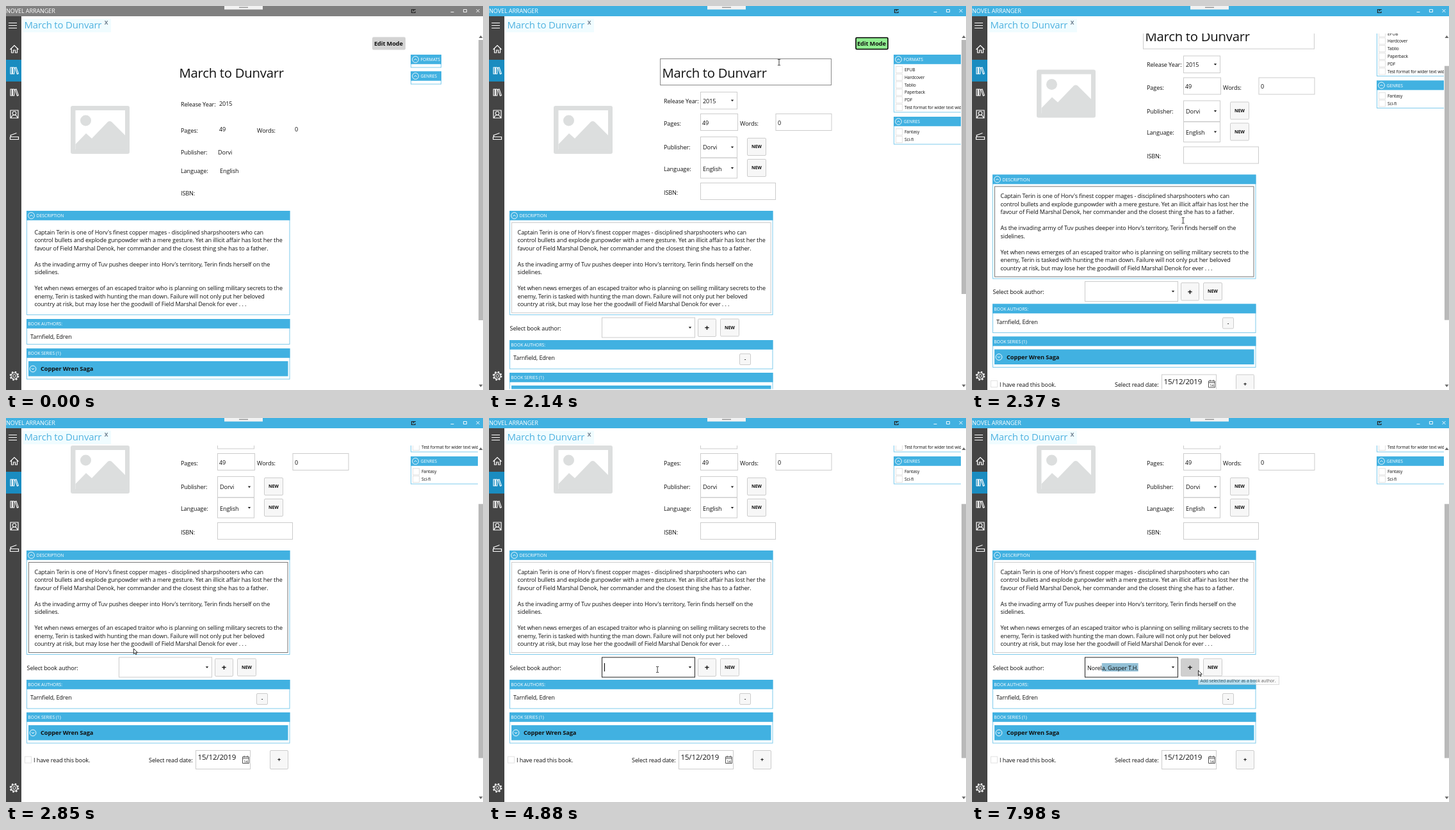
Recreate the animation shown at these times as an HTML page. Size 745 by 600 pixels, loop 8 s.

```html
<!DOCTYPE html>
<html lang="en">
<head>
<meta charset="utf-8">
<title>Book details</title>
<style>
html, body { margin: 0; width: 100%; height: 100%; overflow: hidden; background: #fff; }
svg { display: block; font-family: "Open Sans", "Noto Sans", sans-serif; }
text { letter-spacing: -.012em; white-space: pre; }
</style>
</head>
<body>
<svg id="stage" width="745" height="600" viewBox="0 0 745 600"></svg>
<script>
const LOOP = 8000;
const BLUE = '#41b1e1';
const TITLE = 'March to Dunvarr';
const PICK = 'Norela, Gasper T.H.';

// Drawing helpers; boxes are given by their edges
const text = (x, y, s, size = 9.1, more = '') =>
  `<text x="${x}" y="${y}" font-size="${size}" fill="#111" ${more}>${s}</text>`;
const white = (x, y, s, size = 6.93) => text(x, y, s, size, 'style="fill:#fff"');
const bold = (x, y, s, size, more = '') => text(x, y, s, size, 'font-weight="700" ' + more);
const fill = (x0, y0, x1, y1, color, more = '') =>
  `<rect x="${x0}" y="${y0}" width="${x1 - x0}" height="${y1 - y0}" fill="${color}" ${more}/>`;
const box = (x0, y0, x1, y1, line = '#ccc', back = '#fff', more = '') =>
  fill(x0 + .5, y0 + .5, x1 - .5, y1 - .5, back, `stroke="${line}" ${more}`);
const line = (d, color = '#fff', width = 1, more = '') =>
  `<path d="${d}" fill="none" stroke="${color}" stroke-width="${width}" ${more}/>`;
const group = (id, body) => `<g id="${id}">${body}</g>`;

const chevron = (x, y, up) =>
  `<circle cx="${x}" cy="${y}" r="4.9" fill="none" stroke="#fff" stroke-width=".9"/>` +
  line(up ? `M${x - 2} ${y + 1}l2-2 2 2` : `M${x - 2} ${y - 1}l2 2 2-2`);
const panel = (x0, y0, x1, y1, name, open) =>
  box(x0, y0, x1, y1, '#7fcbec') + fill(x0, y0, x1, y0 + 14.8, BLUE) +
  (open ? chevron(x0 + 7.5, y0 + 7.5, true) : '') +
  white(x0 + (open ? 15.5 : 2.2), y0 + 10, name);
const button = (x0, y0, x1, y1, label, size = 6.9, id = '') =>
  box(x0, y0, x1, y1, '#ccc', '#f7f7f7', `rx="1.5" ${id}`) +
  bold((x0 + x1) / 2, (y0 + y1) / 2 + size * .36, label, size, 'text-anchor="middle"');
const combo = (x0, y0, x1, y1, id = '') => {
  const x = x1 - 8, y = (y0 + y1) / 2;
  return box(x0, y0, x1, y1, '#ccc', '#fff', id) +
    `<path d="M${x - 2.2} ${y - 1.2}h4.4l-2.2 2.8z" fill="#222"/>`;
};
const check = (x, y) => box(x, y - 5.5, x + 11, y + 5.5, '#e2e2e2');

const picture = fill(101, 156, 193, 231, '#dcdede', 'rx="3"') +
  fill(108.5, 163, 186, 224, '#fff') +
  '<circle cx="124.5" cy="179" r="8.5" fill="#dcdede"/>' +
  '<path d="M108.5 216L125 199l9 8 25-26q3-2 6 0l21 21v22.5h-77.5z" fill="#dcdede"/>';

const blurb = [
  [0, 'Captain Terin is one of Horv\'s finest copper mages - disciplined sharpshooters who can'],
  [1, 'control bullets and explode gunpowder with a mere gesture. Yet an illicit affair has lost her the'],
  [2, 'favour of Field Marshal Denok, her commander and the closest thing she has to a father.'],
  [4, 'As the invading army of Tuv pushes deeper into Horv\'s territory, Terin finds herself on the'],
  [5, 'sidelines.'],
  [7, 'Yet when news emerges of an escaped traitor who is planning on selling military secrets to the'],
  [8, 'enemy, Terin is tasked with hunting the man down. Failure will not only put her beloved'],
  [9, 'country at risk, but may lose her the goodwill of Field Marshal Denok for ever . . .']
].map(([row, s]) => text(44.5, 356.6 + row * 12.53, s)).join('');

const authors = (y, y1, base) =>
  panel(32, y, 443.5, y1, 'BOOK AUTHORS:') + text(38, base, 'Tarnfield, Edren');
const series = y =>
  panel(32, y, 443.5, y + 48.5, 'BOOK SERIES (1)') +
  fill(35, y + 20, 440.5, y + 43.5, BLUE) + chevron(42, y + 32, false) +
  bold(54, y + 35.3, 'Copper Wren Saga', 9.3);
const labels = rows => rows.map(([x, y, s]) => text(x, y, s)).join('');

const shared = picture + text(270.5, 111.5, TITLE, 20.3);

const view =
  box(572, 48.5, 624, 68.5, '#d3d3d3', '#d3d3d3', 'rx="1.5"') + bold(575, 62, 'Edit Mode', 9.2) +
  panel(632, 76, 680, 96.5, 'FORMATS', true) + panel(632, 102, 680, 122.5, 'GENRES', true) +
  shared +
  labels([[273, 157, 'Release Year:'], [333, 155.5, '2015'], [273, 197.5, 'Pages:'], [333, 196, '49'],
    [392, 197.5, 'Words:'], [451, 196, '0'], [273, 232.3, 'Publisher:'], [331, 232.3, 'Dorvi'],
    [273, 260.6, 'Language:'], [334, 260.6, 'English'], [273, 295.5, 'ISBN:']]) +
  panel(32, 320, 443.5, 483, 'DESCRIPTION', true) + blurb +
  authors(489, 529, 520.3) + series(535);

const list = (names, y) => names.map((s, i) =>
  check(635, y + i * 11.8) + text(649, y + 2.5 + i * 11.8, s, 6.65)).join('');

const edit =
  box(572.5, 49, 623.5, 68, '#000', '#90ee90', 'rx="1.5" stroke-width="1.6"') + bold(575, 62, 'Edit Mode', 9.2) +
  panel(632, 76, 760, 166.5, 'FORMATS', true) +
  list(['EPUB', 'Hardcover', 'Tablio', 'Paperback', 'PDF', 'Test format for wider text width'], 99.5) +
  panel(632, 173, 760, 216.5, 'GENRES', true) + list(['Fantasy', 'Sci-fi'], 196.8) +
  box(267, 82, 535, 124, '#ccc', '#fff', 'id="head"') + shared +
  combo(330, 134, 388, 161.5) + box(330, 168, 389, 195) + box(447.5, 168, 535.5, 195) +
  combo(330, 204, 388, 237.5) + combo(330, 237, 388, 269.5) + box(330, 276, 448, 303) +
  button(403, 206, 433, 234, 'NEW') + button(403, 239, 433, 267, 'NEW') +
  labels([[273, 151.5, 'Release Year:'], [334, 151.5, '2015'], [273, 187, 'Pages:'], [333, 185.7, '49'],
    [392, 187, 'Words:'], [451, 185.7, '0'], [273, 224.3, 'Publisher:'], [334, 224.3, 'Dorvi'],
    [273, 257.7, 'Language:'], [334, 257.7, 'English'], [273, 294.8, 'ISBN:'],
    [32.5, 506.5, 'Select book author:'], [43, 651, 'I have read this book.'], [223, 651, 'Select read date:']]) +
  panel(32, 320, 443.5, 483, 'DESCRIPTION', true) +
  box(35, 338, 440.5, 480, '#ccc', '#fff', 'id="desc"') + blurb +
  combo(176, 486.5, 322, 518.5, 'id="pick"') +
  '<rect id="mark" y="496" height="13" fill="#93c0d6"/>' + text(180, 506.5, '', 9.1, 'id="typed"') +
  '<rect id="caret" y="496" width="1" height="13" fill="#000"/>' +
  button(326, 488.5, 355, 517, '+', 13, 'id="plus"') + button(361, 488.5, 391, 516.5, 'NEW') +
  authors(522, 567.5, 553) + button(391, 543, 409, 561, '-', 6.9) + series(573) +
  check(29, 647) + box(296, 632, 382, 662) + text(299.5, 647, '15/12/2019', 11.5) +
  line('M369.5 642.5h10v10h-10zM369.5 645h10M372 640.5v3M377 640.5v3', '#555') +
  text(371.2, 651.6, '14', 6) + button(412, 632, 441, 662, '+', 9);

const popup = box(176, 405, 322, 601, '#aaa') +
  ['Abrenti, Lowe', 'Corvell, Dana', 'Dunhask, Peter', 'Fallowim, Ines', 'Harstook, Olen', 'Lindrake, Mary',
    PICK, 'Ostrivel, Jan', 'Tarnfield, Edren'].map((s, i) => text(181, 420 + i * 21, s)).join('');

const icons =
  line('M4 26.5h13M4 30.5h13M4 34.5h13', '#fff', 1.1) +
  line('M6.5 68L13 61.5l6.5 6.5M8.5 66.5V73h3v-4h3v4h3v-6.5', '#fff', 1.2) +
  [96, 130].map(y => line(`M7 ${y}h2.4v10H7zM10.4 ${y}h2.4v10h-2.4zM14 ${y + .6}l2-.6 3.4 9.6-2 .7z`, '#fff', 1.1)).join('') +
  line('M7 163h12v12H7zM8 175c1-6 9-6 10 0', '#fff', 1.2) +
  '<circle cx="13" cy="167.5" r="2.8" fill="#444" stroke="#fff" stroke-width="1.1"/>' +
  line('M6.5 204.5h13v4h-13zM8 204.5l-1-2.5 9.5-3.5', '#fff', 1.2) +
  '<g fill="none" stroke="#fff"><circle cx="13" cy="578" r="2.3"/><circle cx="13" cy="578" r="5" stroke-width="1.2"/>' +
  '<circle cx="13" cy="578" r="6.4" stroke-width="1.8" stroke-dasharray="2.5 2.526"/></g>';

const chrome =
  fill(0, 0, 745, 16, BLUE, 'id="bar"') + white(0, 11.4, 'NOVEL ARRANGER', 9.1) +
  fill(341, 0, 401, 5.5, '#f2f2f2') + fill(364, 1.5, 378, 3, '#999') +
  line('M638 5.5h-4.5v5h5.5v-2M636 8.5c0-2 1-3 4-3', '#222', 1.2) +
  line('M694.5 9.5h5M714.5 5.5h5v4h-5zM734.5 5l5 5M739.5 5l-5 5', '#fff', .9) +
  fill(0, 16, 24, 600, '#444') + fill(0, 84, 24, 118, '#1a8cc0') + icons +
  fill(27, 20, 164, 41, '#f0fcff') + text(28.5, 35, TITLE, 15, 'style="fill:#4fb2e0"') +
  bold(153.8, 29, 'X', 8.5, 'style="fill:#68798a"') +
  '<path d="M738.5 50l3-4 3 4zM738.5 591.5l3 4 3-4z" fill="#666"/>' +
  fill(738, 53, 745, 491, '#b9b9b9', 'id="thumb"');

const pointers =
  group('arrow', '<path d="M.5.5v8l1.9-1.7 1.3 2.8 1.4-.6-1.3-2.7h2.5z" fill="#fff" stroke="#000" stroke-width=".8"/>') +
  group('beam', line('M-2-4.5h1.5l.5.5.5-.5H2M-2 4.5h1.5l.5-.5.5.5H2M0-4v8', '#222', .9));

const tip = group('tip', box(353, 403, 480, 417, '#ccc', '#fafafa') +
  text(356.5, 412.7, 'Add selected author as a book author.', 6.8));

const $ = id => document.getElementById(id);
$('stage').innerHTML =
  '<clipPath id="port"><rect x="24" y="43" width="713" height="555.5"/></clipPath>' +
  fill(0, 0, 745, 600, '#fff') +
  `<g clip-path="url(#port)">${group('view', view)}${group('edit', edit)}</g>` +
  chrome + group('popup', popup) + tip + pointers;

// Pointer track: time, x, y
const track = [
  [220, 563, 566], [450, 625, 390], [720, 671, 180], [900, 660, 85], [990, 629, 52], [1060, 617, 43],
  [1180, 617, 43], [1230, 590, 49], [1300, 576, 57], [1380, 598, 63], [1780, 598, 63], [2140, 453, 88],
  [2200, 453, 88], [2290, 330, 335], [2370, 330, 335], [2850, 199, 360], [3130, 199, 360], [3380, 290, 398],
  [3480, 316, 387], [3580, 316, 387], [3720, 309, 382], [4050, 309, 382], [4250, 250, 440], [4450, 252, 415],
  [4650, 263, 393], [6920, 264, 393], [7250, 325, 389], [7520, 350, 393], [7610, 350, 393], [7670, 353, 394]
];
const beamTimes = [[2000, 2700], [4560, 5340], [6810, 7200]];
const within = (t, a, b) => t >= a && t < b;
// Last value whose time has come
const at = (steps, t) => steps.reduce((v, [time, next]) => t >= time ? next : v, 0);

function place(t) {
  const i = track.findIndex(p => p[0] > t);
  if (i < 0) return track[track.length - 1].slice(1);
  if (i === 0) return track[0].slice(1);
  const [a, b] = [track[i - 1], track[i]];
  const k = (t - a[0]) / (b[0] - a[0]);
  return [1, 2].map(n => a[n] + (b[n] - a[n]) * k);
}
const show = (id, on) => $(id).setAttribute('visibility', on ? 'visible' : 'hidden');
const set = (id, name, value) => $(id).setAttribute(name, value);

function render(t) {
  const editing = t >= 1610;
  const scroll = at([[2290, 56.5], [2460, 113]], t);
  $('view').style.display = editing ? 'none' : '';
  $('edit').style.display = editing ? '' : 'none';
  set('edit', 'transform', `translate(0 ${-scroll})`);
  set('bar', 'fill', editing ? BLUE : '#808080');
  set('thumb', 'y', 53 + scroll * .72);
  set('thumb', 'height', editing ? 397 : 438);

  set('head', 'stroke', within(t, 2050, 2230) ? '#888' : '#ccc');
  set('desc', 'stroke', within(t, 2230, 3250) ? '#777' : '#ccc');
  set('pick', 'stroke', t >= 3870 ? '#222' : '#ccc');
  set('plus', 'fill', t >= 7250 ? '#cfcfcf' : '#f7f7f7');
  show('popup', within(t, 3870, 4430));

  const count = at([[5340, 1], [5570, 2], [5650, 3], [5820, 4], [5970, 5]], t);
  const full = t >= 5420;
  const typed = $('typed');
  const value = full ? PICK : PICK.slice(0, count);
  if (typed.textContent !== value) typed.textContent = value;
  const edge = editing && count ? typed.getSubStringLength(0, count) : 0;
  set('mark', 'x', 180 + edge);
  set('mark', 'width', full ? typed.getComputedTextLength() - edge : 0);
  set('caret', 'x', 180 + edge);
  $('caret').style.display = within(t, 4880, 5420) ? '' : 'none';

  const [x, y] = place(t);
  const beam = beamTimes.some(([a, b]) => within(t, a, b));
  for (const id of ['arrow', 'beam']) set(id, 'transform', `translate(${x} ${y})`);
  show('beam', beam);
  show('arrow', t >= 220 && !beam && !within(t, 5340, 6810));
  set('tip', 'opacity', at([[7900, .3], [7980, .65]], t));
}

const start = performance.now();
function tick() {
  render((performance.now() - start) % LOOP);
  requestAnimationFrame(tick);
}
tick();
</script>
</body>
</html>
```
